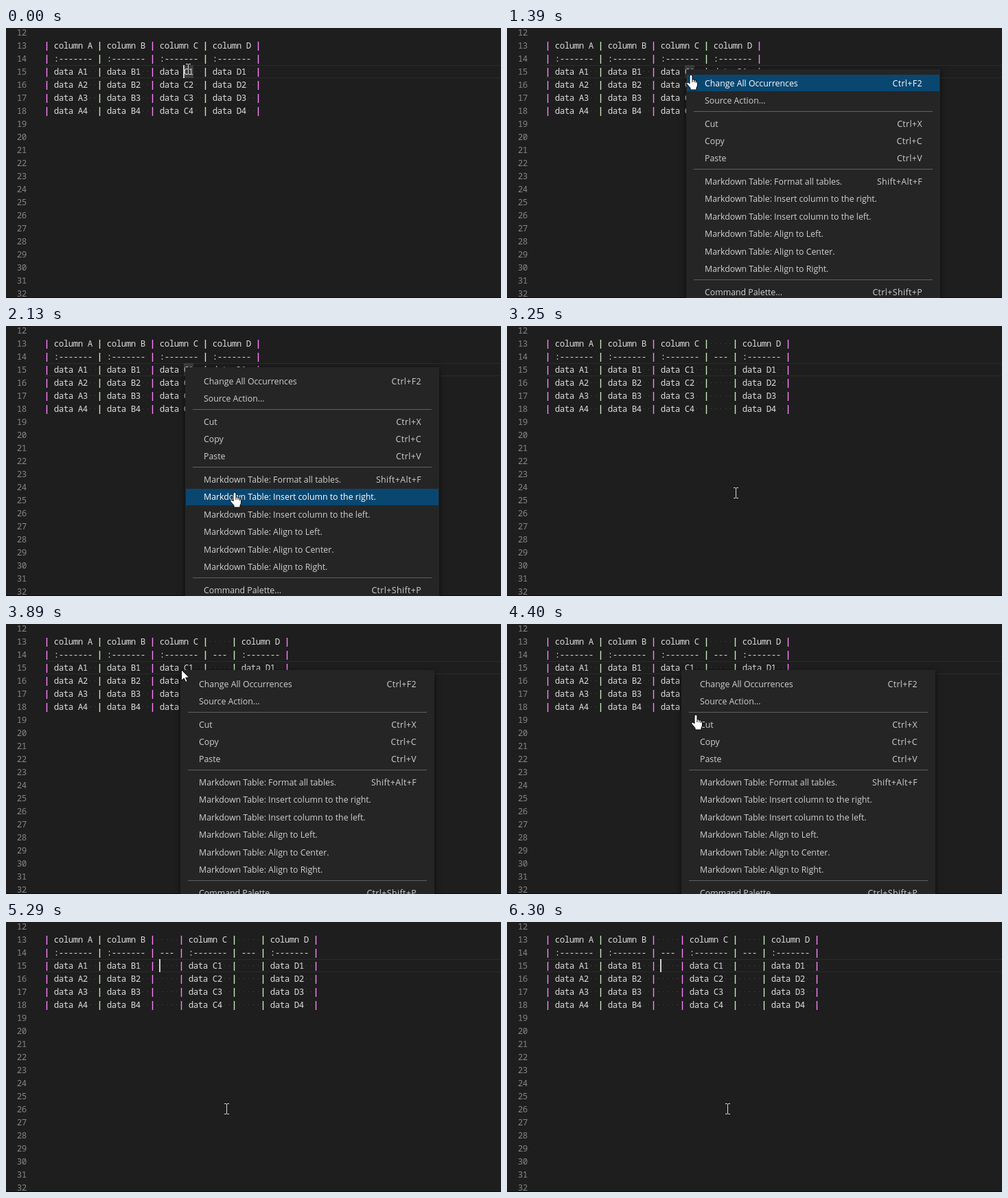
Write an HTML page with a canvas that moves like this. It is 721x393 px and loops after 6580 ms.

```html
<!DOCTYPE html>
<html lang="en">
<head>
<meta charset="utf-8">
<title>Markdown table menu</title>
<style>
html, body { margin: 0; width: 100%; height: 100%; overflow: hidden; background: #1e1e1e; }
canvas { display: block; }
</style>
</head>
<body>
<canvas id="stage" width="721" height="393"></canvas>
<script>
const ctx = document.getElementById('stage').getContext('2d');
const LOOP = 6580, CHAR = 7, LINE = 19, LEFT = 56;
const CODE_FONT = '12.5px "Noto Sans Mono", "DejaVu Sans Mono", monospace';
const SANS = '"Open Sans", "Noto Sans", sans-serif';

// Menu font sized so that its longest label measures the wanted width.
function fitFont(family, sample, width) {
  ctx.font = `500 20px ${family}`;
  return `500 ${(20 * width / ctx.measureText(sample).width).toFixed(2)}px ${family}`;
}
const menuFont = fitFont(SANS, 'Markdown Table: Insert column to the right.', 251);

const MENU = [
  [20, 'Change All Occurrences', 'Ctrl+F2'],
  [45, 'Source Action...', ''],
  [79.5, 'Cut', 'Ctrl+X'],
  [104.5, 'Copy', 'Ctrl+C'],
  [129.5, 'Paste', 'Ctrl+V'],
  [163.5, 'Markdown Table: Format all tables.', 'Shift+Alt+F'],
  [188.5, 'Markdown Table: Insert column to the right.', ''],
  [214, 'Markdown Table: Insert column to the left.', ''],
  [239.5, 'Markdown Table: Align to Left.', ''],
  [265, 'Markdown Table: Align to Center.', ''],
  [290.5, 'Markdown Table: Align to Right.', ''],
  [324, 'Command Palette...', 'Ctrl+Shift+P']
];
const RULES = [61, 145, 306];

// Mouse phases: start, kind, step length, path of [time, x, y].
const MOUSE = [
  [0, 'beam', 60, [[850, 265, 60], [910, 254, 55], [970, 261, 60]]],
  [1030, 'arrow', 60, [[1030, 262, 59]]],
  [1390, 'hand', 46.6, [[1390, 268, 68], [1480, 281, 96], [1670, 319, 181],
    [1800, 326, 213], [2000, 330, 237], [2130, 333, 242]]],
  [2610, 'beam', 49, [[3250, 333, 243], [3400, 305, 175], [3640, 248, 75], [3800, 255, 67]]],
  [3840, 'arrow', 50, [[3840, 255, 66]]],
  [4270, 'hand', 45, [[4270, 261, 79], [4400, 281, 155], [4630, 309, 240],
    [4740, 317, 263], [4860, 321, 272]]],
  [5190, 'beam', 50, [[5190, 321, 272]]]
];
const MENUS = [[1030, 2610, 261, 60], [3840, 5190, 254, 67]];
const CARETS = [[0, 420, 259], [850, 1030, 259], [2740, 3250, 301],
  [5290, 5800, 224], [6300, LOOP, 224]];

const within = t => ([from, to]) => t >= from && t < to;

function rect(color, x, y, w, h) {
  ctx.fillStyle = color;
  ctx.fillRect(x, y, w, h);
}

function along(path, t) {
  if (t <= path[0][0]) return path[0].slice(1);
  for (let i = 1; i < path.length; i++) {
    const [t0, x0, y0] = path[i - 1], [t1, x1, y1] = path[i];
    if (t <= t1) {
      const k = (t - t0) / (t1 - t0);
      return [Math.round(x0 + (x1 - x0) * k), Math.round(y0 + (y1 - y0) * k)];
    }
  }
  return path[path.length - 1].slice(1);
}

function mouseAt(t) {
  const [, kind, step, path] = MOUSE.filter(m => t >= m[0]).pop();
  const begin = path[0][0], end = path[path.length - 1][0];
  const held = t >= end ? end : begin + Math.floor((t - begin) / step + 1e-6) * step;
  const [x, y] = along(path, held);
  return { kind, x, y };
}

function tableRow(line, columns) {
  const cells = columns.map(c => {
    if (line === 13) return c ? ` column ${c} ` : '     ';
    if (line === 14) return c ? ' :------- ' : ' --- ';
    return c ? ` data ${c}${line - 14}  ` : '     ';
  });
  return `|${cells.join('|')}|`;
}

// Each glyph sits in the middle of its cell.
function drawCode(text, left, y, color) {
  for (let i = 0; i < text.length; i++) {
    const ch = text[i], x = left + i * CHAR;
    if (ch === ' ') {
      if (text[i - 1] === ' ' || text[i + 1] === ' ') rect('#474747', x + 3, y - 5, 1, 1);
      continue;
    }
    const pipe = ch === '|';
    ctx.font = pipe ? `bold ${CODE_FONT}` : CODE_FONT;
    ctx.fillStyle = !pipe ? color : i % 2 ? '#c4ecba' : '#ff82ff';
    ctx.fillText(ch, x + 3.5, y);
  }
}

function drawEditor(t) {
  rect('#1e1e1e', 0, 0, 721, 393);
  rect('#2b2b2b', LEFT, 54, 665, 1);
  rect('#2b2b2b', LEFT, 72, 665, 1);
  if (t < 2740) rect('#3c3e3e', 259, 54, 14, 19);

  const columns = t < 2740 ? ['A', 'B', 'C', 'D']
    : t < 5290 ? ['A', 'B', 'C', '', 'D'] : ['A', 'B', '', 'C', '', 'D'];
  ctx.textAlign = 'center';
  for (let line = 12; line <= 32; line++) {
    const y = 68 + (line - 15) * LINE;
    drawCode(String(line), 16, y, '#858585');
    if (line >= 13 && line <= 18) drawCode(tableRow(line, columns), LEFT, y, '#dcdcdc');
  }
  rect('#0c0c0c', 0, 392, 721, 1);

  const caret = CARETS.find(within(t));
  if (caret) rect('#d0d0cc', caret[2] - 1, 54, 2, 19);
}

function drawMenu(mx, my, mouse) {
  ctx.save();
  ctx.shadowColor = 'rgba(0,0,0,.6)';
  ctx.shadowBlur = 8;
  ctx.shadowOffsetY = 2;
  rect('#252526', mx, my, 370, 345);
  ctx.restore();
  for (const y of RULES) rect('#606060', mx + 11, my + y, 348, 1);

  ctx.save();
  ctx.font = menuFont;
  for (const [offset, label, keys] of MENU) {
    const mid = my + offset;
    const active = mouse.kind === 'hand' && Math.abs(mouse.y - mid) <= 12.5;
    if (active) rect('#094771', mx + 1, Math.round(mid - 12), 368, 24);
    ctx.fillStyle = active ? '#ffffff' : '#d0d0d0';
    const base = Math.round(mid + 4.5);
    ctx.textAlign = 'left';
    ctx.letterSpacing = '0px';
    ctx.fillText(label, mx + 27, base);
    ctx.textAlign = 'right';
    ctx.letterSpacing = '0.4px';
    ctx.fillText(keys, mx + 344, base);
  }
  ctx.restore();
}

const ARROW = new Path2D('M.5 .5V16.5L4.2 13L6.8 18.6L9.2 17.5L6.7 12.1H11.8Z');
const HAND = new Path2D('M-2 13V2Q-2 0 0 0Q2 0 2 2V7Q4.5 6 5 8Q7 7.2 7.5 9' +
  'Q9.5 8.7 9.5 11V15Q9.5 17 8 19V22H-1V19.5L-6 13.5Q-7 11.5 -5.2 11Q-3.8 10.8 -2 13Z');
const FINGERS = new Path2D('M2 7V11M5 8V11M7.5 9V12');

function drawMouse({ kind, x, y }) {
  if (kind === 'beam') {
    for (const dy of [-8, 7]) {
      rect('#d8d8d8', x - 3, y + dy, 3, 1);
      rect('#d8d8d8', x + 1, y + dy, 3, 1);
    }
    rect('#d8d8d8', x, y - 7, 1, 14);
    return;
  }
  ctx.save();
  ctx.translate(x, y);
  ctx.fillStyle = '#fff';
  ctx.strokeStyle = '#000';
  ctx.lineWidth = 1;
  const shape = kind === 'hand' ? HAND : ARROW;
  ctx.fill(shape);
  ctx.stroke(shape);
  if (kind === 'hand') ctx.stroke(FINGERS);
  ctx.restore();
}

const start = performance.now();
function draw() {
  const t = (performance.now() - start) % LOOP;
  const mouse = mouseAt(t);
  drawEditor(t);
  const menu = MENUS.find(within(t));
  if (menu) drawMenu(menu[2], menu[3], mouse);
  drawMouse(mouse);
  requestAnimationFrame(draw);
}
draw();
</script>
</body>
</html>
```
